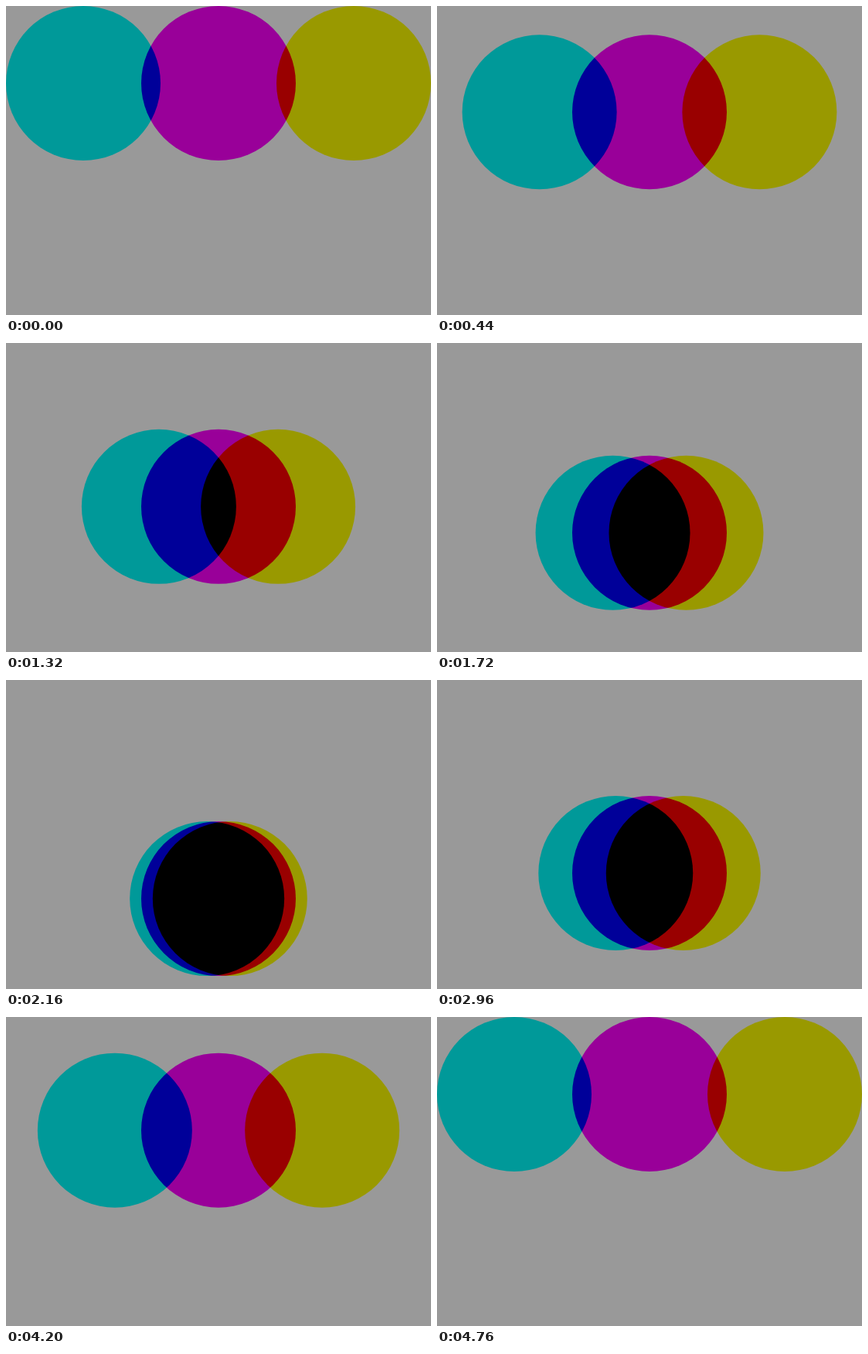
Recreate the animation shown at these times as an HTML page with a canvas. Size 550 px wide and 400 px high, loop 4800 ms.

```html
<!DOCTYPE html>
<html lang="en">
<head>
<meta charset="utf-8">
<title>Subtractive colour mixing</title>
<style>
  html, body { margin: 0; width: 100%; height: 100%; overflow: hidden; background: #999; }
  canvas { display: block; }
</style>
</head>
<body>
<canvas id="stage" width="550" height="400"></canvas>
<script>
const ctx = document.getElementById("stage").getContext("2d");

const STEP_MS = 40;
const STEPS = 120;
const TURN = 59; // step at which the discs meet
const RADIUS = 100;
const CENTER_X = 275;
const SPREAD = 175;
const TOP_Y = 100;
const DROP = 200;

const discs = [
  { color: "#0ff", side: -1 },
  { color: "#f0f", side: 0 },
  { color: "#ff0", side: 1 }
];

// 0 = apart at the top, 1 = merged at the bottom
function progress(step) {
  return step <= TURN ? step / TURN : (STEPS - 1 - step) / (STEPS - 1 - TURN);
}

function draw(ms) {
  const p = progress(Math.floor(ms / STEP_MS + 0.001) % STEPS);

  ctx.globalCompositeOperation = "source-over";
  ctx.fillStyle = "#999";
  ctx.fillRect(0, 0, 550, 400);

  ctx.globalCompositeOperation = "multiply";
  for (const { color, side } of discs) {
    ctx.fillStyle = color;
    ctx.beginPath();
    ctx.arc(CENTER_X + side * SPREAD * (1 - p), TOP_Y + DROP * p, RADIUS, 0, Math.PI * 2);
    ctx.fill();
  }
}

const start = performance.now();

function tick() {
  draw(performance.now() - start);
  requestAnimationFrame(tick);
}
tick();
</script>
</body>
</html>
```
